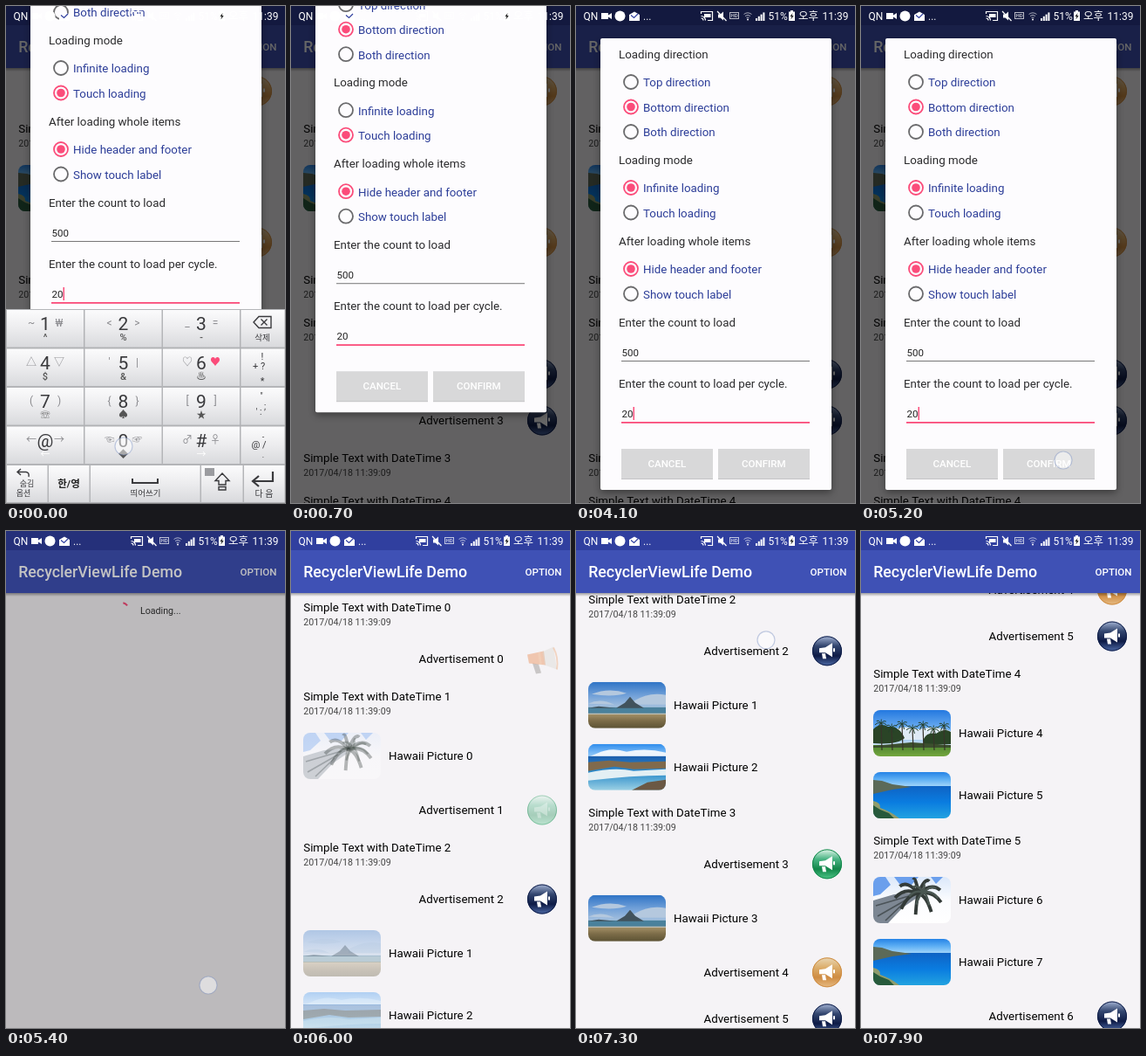
An HTML page with a canvas that plays this animation: 320x569 px, repeating every 8 s.

```html
<!DOCTYPE html>
<html lang="ko">
<head>
<meta charset="utf-8">
<title>List loading demo</title>
<style>
html, body { margin: 0; width: 100%; height: 100%; overflow: hidden; }
canvas { display: block; }
</style>
</head>
<body>
<canvas id="stage" width="320" height="569"></canvas>
<script>
const c = document.getElementById('stage').getContext('2d');
const FONT = 'Roboto, "Noto Sans CJK KR", "Noto Sans CJK", "DejaVu Sans", sans-serif';
const PINK = '#fb4c7a', LOOP = 8000, STEP = 100, HEADER = 71, MARGIN = 14.22;
const HEIGHT = { t: 49, a: 53, p: 71 };
const OLD_LIST = { items: 'atpattaatt', ads: [3, 3, 2, 2], pics: [3] };
const NEW_LIST = { items: 'tatpatapptapaatpptpp', ads: [0, 1, 2, 1, 3, 2], pics: [0, 1, 2, 1, 4, 3, 0, 3] };

const clamp = v => Math.max(0, Math.min(1, v));
const ease = v => (v = clamp(v)) * v * (3 - 2 * v);

function text(s, x, y, size = 13.33, color = '#000', weight = 400, align = 'left') {
  c.font = `${weight} ${size}px ${FONT}`;
  c.fillStyle = color;
  c.textAlign = align;
  c.fillText(s, x, y + size * .36);
}
const label = (s, x, y, size, color, weight) => text(s, x, y, size, color, weight, 'center');
function rect(x, y, w, h, color) { c.fillStyle = color; c.fillRect(x, y, w, h); }
function shape(d, color) { c.fillStyle = color; c.fill(new Path2D(d)); }
function line(d, color, width = 1) {
  c.strokeStyle = color;
  c.lineWidth = width;
  c.stroke(new Path2D(d));
}
function disc(x, y, r, color) {
  c.fillStyle = color;
  c.beginPath();
  c.arc(x, y, r, 0, 7);
  c.fill();
}
function ring(x, y, r, color, width, from = 0, to = 7) {
  c.strokeStyle = color;
  c.lineWidth = width;
  c.beginPath();
  c.arc(x, y, r, from, to);
  c.stroke();
}
function vertical(y0, y1, ...colors) {
  const g = c.createLinearGradient(0, y0, 0, y1);
  colors.forEach((color, i) => g.addColorStop(i / (colors.length - 1), color));
  return g;
}
function group(x, y, alpha, draw) {
  c.save();
  c.translate(x, y);
  c.globalAlpha *= alpha;
  draw();
  c.restore();
}

function fronds(x, y, size, count, color) {
  for (let i = 0; i < count; i++) {
    const a = i / count * 6.28 + .3, dx = Math.cos(a) * size, dy = Math.sin(a) * size * .75;
    line(`M${x} ${y}Q${x + dx * .6} ${y + dy * .6 - size * .3} ${x + dx} ${y + dy + size * .15}`, color, size / 7);
  }
}

const SCENES = [
  () => {
    rect(0, 0, 89, 53, vertical(0, 53, '#dbe8fa', '#fbfcfe', '#ffffff'));
    shape('M0 0H14L20 9L8 20L0 22ZM24 0H52L44 9L30 8ZM66 0H80L72 8Z', '#6b9fec');
    shape('M0 27L24 20L47 18L50 24L34 35L17 53H0Z', '#7d8793');
    line('M3 33L44 21M5 45L40 25M14 50L36 29', '#4b5358', 1.6);
    fronds(52, 19, 27, 9, '#333b38');
    fronds(58, 18, 17, 7, '#4a5752');
  },
  () => {
    rect(0, 0, 89, 30, vertical(0, 30, '#2f74c6', '#6f9fd8', '#a9c3de'));
    shape('M4 14Q24 6 44 13Q28 18 4 14ZM52 22Q70 11 89 15V26H52ZM0 25Q14 18 30 26Z', '#b4c8de');
    rect(0, 29, 89, 8, '#4a819c');
    shape('M0 30L12 28L32 30ZM32 30L42 24L48 17L54 24L64 30Z', '#41525c');
    rect(0, 36, 89, 17, vertical(36, 53, '#a8946a', '#7c6c48', '#5c5234'));
    line('M0 36.500H89', '#c3cbc8');
  },
  () => {
    rect(0, 0, 89, 15, vertical(0, 15, '#2f8ded', '#9ed0fa'));
    shape('M10 11Q26 3 44 9Q66 4 89 10V15H0Z', '#eef5fc');
    rect(0, 14, 89, 39, vertical(14, 53, '#1c5fae', '#2f8ecb', '#9bd0e4'));
    shape('M0 21L24 19L48 21L89 20V28L52 29L30 26L0 31Z', '#806a4c');
    shape('M0 33Q30 26 52 31L89 29V36Q50 36 0 42Z', '#e3eff4');
    shape('M50 53L68 44L89 41V53Z', '#6b5844');
  },
  () => {
    rect(0, 0, 89, 17, vertical(0, 17, '#2583e6', '#5fb0f4', '#a8d8fa'));
    rect(0, 16, 89, 37, vertical(16, 53, '#0f63c4', '#0a7ce0', '#22a2e0'));
    shape('M0 9L10 10L22 14L44 17L22 20L0 25Z', '#5c6a58');
    shape('M0 33Q9 35 8 41Q20 45 30 53H0Z', '#8f9c6c');
    shape('M0 38L8 43L18 47L24 53H0Z', '#275a3c');
  },
  () => {
    rect(0, 0, 89, 42, vertical(0, 42, '#2479e0', '#6cadf0', '#d3e6f6'));
    shape('M20 24Q34 16 52 22Q70 17 89 24V34H20Z', '#dfeaf5');
    rect(0, 40, 89, 13, vertical(40, 53, '#4f8430', '#73a63e'));
    shape('M0 22Q8 14 17 19Q30 18 36 32Q28 40 0 38ZM58 33Q62 25 72 27Q82 20 89 25V39H58Z', '#2a4426');
    shape('M0 41L44 37L89 40V43H0Z', '#3c4f2e');
    for (let i = 0; i < 7; i++) {
      const x = 9 + i * 12, y = 15 + i * 5 % 9;
      line(`M${x} ${y}L${x + 1} 46`, '#38342a', 1.2);
      fronds(x, y, 7, 7, '#24402a');
    }
  }
];

function picture(kind, y, alpha) {
  group(14, y - 26.5, alpha, () => {
    c.beginPath();
    c.roundRect(0, 0, 89, 53, 8);
    c.clip();
    SCENES[kind]();
  });
}

const SPHERES = [
  null,
  ['#e2f6ea', '#49b483', '#12874a', '#4cc486'],
  ['#a3b3d4', '#33466f', '#0e1b46', '#4d6aa6'],
  ['#e8d6b4', '#dcae6c', '#cf8c42', '#e6bb84']
];
function adIcon(kind, y, alpha) {
  group(288, y, alpha, () => {
    if (!kind) {
      shape('M-11 5L-4 6L-1 16L-7 17Z', '#77736e');
      shape('M-17 -5L2 -9L4 7L-15 5Z', '#e8732c');
      shape('M0 -8L13 -14L17 12L3 7Z', '#d8d3cb');
      shape('M-5 -7L-2 -8L0 7L-3 6Z', '#f3d9c4');
      line('M13 -13Q19 -2 17 12', '#ee9a5e', 1.8);
      return;
    }
    disc(0, 0, 17, vertical(-17, 17, ...SPHERES[kind]));
    ring(0, 0, 16.5, SPHERES[kind][2], 1);
    shape('M-9 -3L-2 -4L6 -9V7L-2 2L-9 2ZM-6 3L-2 3L-1 9L-5 9Z', '#fff');
    line('M8 -3V1', '#fff', 2);
  });
}

function spinnerRow(y, time) {
  const start = -1.57 + time / 380, sweep = .4 + 4 * ease(time / 667);
  ring(132, y, 9, PINK, 2, start, start + sweep);
  text('Loading...', 154, y, 10.67, '#333');
}

function adRow(n, kind, y, alpha, iconAlpha) {
  group(0, 0, alpha, () => {
    text('Advertisement ' + n, 146.5, y);
    adIcon(kind, y, iconAlpha);
  });
}

function drawList({ items, ads, pics }, scroll, alpha) {
  const count = { t: 0, a: 0, p: 0 };
  let y = HEADER - scroll;
  for (const type of items) {
    const n = count[type]++, mid = y + HEIGHT[type] / 2;
    if (y < 569 && y + HEIGHT[type] > 0) {
      if (type === 't') {
        text('Simple Text with DateTime ' + n, MARGIN, y + 16.5);
        text('2017/04/18 11:39:09', MARGIN, y + 33.5, 10.67, '#444');
      } else if (type === 'a') {
        adRow(n, ads[n], mid, 1, ads[n] === 2 ? 1 : alpha);
      } else {
        picture(pics[n], mid, alpha);
        text('Hawaii Picture ' + n, 112, mid);
      }
    }
    y += HEIGHT[type];
  }
  return y;
}

function appBar() {
  rect(0, HEADER, 320, 4, vertical(HEADER, HEADER + 4, 'rgba(0,0,0,.35)', 'rgba(0,0,0,0)'));
  rect(0, 0, 320, HEADER, '#3f51b5');
  rect(0, 0, 320, 22, '#303f9f');
  text('RecyclerViewLife Demo', MARGIN, 47, 17.78, '#fff', 500);
  text('OPTION', 268.6, 47, 11.56, '#fff', 500);
}

function statusIcons() {
  const W = '#fff', dim = 'rgba(255,255,255,.7)';
  text('QN', 8.5, 11.5, 12, W);
  shape('M29 8H37V10.500L41 8V15L37 12.500V15H29Z', W);
  disc(50.5, 11.5, 6, W);
  shape('M61 10L67 6.500L73 10V17H61Z', W);
  line('M63 10.500L66.500 13.500L71 9', '#303f9f', 1.2);
  text('...', 77, 11.5, 12, W);
  line('M143.500 9V6.500H156.500V16.500H151M143.500 11.500A5 5 0 0 1 148.500 16.500M143.500 14A2.500 2.500 0 0 1 146 16.500', W, 1.2);
  rect(147, 9, 7.5, 4, W);
  shape('M163 9.500H165.500L169 6.500V16.500L165.500 13.500H163Z', W);
  line('M162 6L172.500 17', W, 1.2);
  c.strokeStyle = dim;
  c.lineWidth = 1;
  c.strokeRect(176.5, 7.5, 10, 7);
  label('HD', 181.5, 11.3, 6, dim, 700);
  for (const r of [2.5, 5, 7.5]) ring(197, 15.5, r, dim, .9, -2.2, -.94);
  disc(197, 15.5, 1, W);
  for (let i = 0; i < 4; i++) rect(206 + i * 2.8, 14 - i * 2.2, 2, 3 + i * 2.2, W);
  text('51%', 220.5, 11.5, 12, W);
  shape('M246 5H249V6.500H251V17H244V6.500H246Z', W);
  shape('M248.500 8L245.500 12H247.300L246.500 15.500L249.700 11H247.800Z', '#222');
  text('오후', 255, 11.5, 12.5, W);
  text('11:39', 282.6, 11.5, 12, W);
}

function radio(name, y, on) {
  ring(63, y, 8, on > .5 ? PINK : '#6a6a6c', 1.8);
  if (on) disc(63, y, 4.8 * on, PINK);
  text(name, 77, y + .5, 13.33, '#2c3d98');
}

function dialog(t) {
  const infinite = clamp((t - 2000) / 200);
  c.save();
  c.shadowColor = 'rgba(0,0,0,.4)';
  c.shadowBlur = 8;
  c.shadowOffsetY = 3;
  c.beginPath();
  c.roundRect(28, 37, 265, 517, 2);
  c.fillStyle = '#fdfcfe';
  c.fill();
  c.restore();
  [['Loading direction', 55], ['Loading mode', 176], ['After loading whole items', 269],
    ['Enter the count to load', 362], ['Enter the count to load per cycle.', 432]]
    .forEach(([s, y]) => text(s, 49, y, 13.33, '#2a2a2c'));
  radio('Top direction', 87, 0);
  radio('Bottom direction', 115.5, 1);
  radio('Both direction', 144, 0);
  radio('Infinite loading', 208, infinite);
  radio('Touch loading', 236.5, 1 - infinite);
  radio('Hide header and footer', 301, 1);
  radio('Show touch label', 329.5, 0);
  text('500', 52.5, 397, 11.56, '#222');
  rect(52, 406, 216, 1, '#777');
  text('20', 52.5, 467, 11.56, '#222');
  rect(52, 476, 216, 1.8, PINK);
  if (Math.floor((t + 35) / 505) % 2 === 0) rect(65.5, 459, 1.5, 15, PINK);
  [['CANCEL', 52], ['CONFIRM', 163]].forEach(([s, x]) => {
    rect(x, 508, 105, 34, '#c4c4c6');
    rect(x, 507, 105, 34, '#d8d8d9');
    label(s, x + 52.3, 524, 11.56, '#fff', 500);
  });
}

const KEYS = ['~1₩^', '<2>%', '_3=-', '△4▽$', "'5|&", '♡6♥♨', '(7)☏', '{8}♠', '[9]★', '←@→←', '☜0☞◆', '♂#♀→'];
function keyBox(x, y, w, h) {
  rect(x, y, w, h, '#b4b5b8');
  rect(x + 1, y + 1, w - 1.5, h - 2, vertical(y, y + h, '#fcfcfd', '#ececee', '#d8d9dc'));
}
function keyboard() {
  const dark = '#3a3a3d', grey = '#8b8b8f', small = (s, x, y, size = 9) => label(s, x, y, size, dark);
  rect(0, 347, 320, 222, '#a8a9ac');
  KEYS.forEach((key, i) => {
    const col = i % 3, row = Math.floor(i / 3), x = col * 89.5, y = 347 + row * 44.5, mid = x + 45;
    const [left, main, right, sub] = [...key];
    keyBox(x, y, 89.5, 44.5);
    label(left, mid - 16, y + 16, 12, grey);
    label(main, mid, y + 16.5, 21, dark);
    label(right, mid + 16, y + 16, 12, right === '♥' ? PINK : grey);
    label(sub, mid, y + 32.5, 11, '←→'.includes(sub) ? '#fff' : '#555', 500);
  });
  for (let row = 0; row < 4; row++) keyBox(268.5, 347 + row * 44.5, 51.5, 44.5);
  line('M284 362L290 355.500H304V368.500H290ZM292.500 358.500L299.500 365.500M299.500 358.500L292.500 365.500', dark, 1.4);
  small('삭제', 294, 380, 9.5);
  small('!', 294, 401, 11);
  small('+ ?', 290, 412, 11);
  small('*', 294, 429, 11);
  small('"', 293, 446, 10);
  small(';', 297, 458, 10);
  small("' :", 290, 464, 10);
  small('@ /', 290, 502, 11);
  small('-', 295, 493);
  small('.', 295, 514);

  [0, 48, 96, 223, 272, 320].forEach((x, i, all) => i < 5 && keyBox(x, 525, all[i + 1] - x, 44));
  line('M17 537L13 533.500L17 530M13 533.500H23Q27 534 26 539', dark, 1.4);
  small('숨김', 24, 547);
  small('옵션', 20, 558);
  label('한/영', 72, 547, 11.5, '#222', 700);
  line('M145 541V546H174V541', dark, 2);
  small('띄어쓰기', 160, 558, 9.5);
  rect(228, 529, 11, 9, '#9b9ca0');
  line('M248 535L256 543.500H252V548H244V543.500H240ZM244 550.500H252V554H244Z', dark, 1.4);
  line('M306 533V544H284M290 538L283 544L290 550', dark, 2.2);
  small('다 음', 296, 558, 10);
}

// x, y, start, end
const TOUCHES = [[135, 504, 0, 200], [69, 203, 1900, 2300], [147, 113, 3400, 3800], [232, 520, 5100, 5600], [218, 409, 7000, 7500]];
function touches(t, scroll) {
  for (const [x, y, start, end] of TOUCHES) {
    if (t < start || t >= end) continue;
    group(x, Math.max(y - scroll, 120), clamp((end - t) / 200), () => {
      disc(0, 0, 10, 'rgba(255,255,255,.5)');
      ring(0, 0, 10, 'rgba(110,135,190,.4)', 1.2);
    });
  }
}

function draw(t) {
  const scroll = 722 * ease((t - 7000) / 700);
  rect(0, 0, 320, 569, '#f5f3f6');
  if (t < 5300) {
    drawList(OLD_LIST, 0, 1);
  } else if (t < 6000) {
    spinnerRow(91, t - 5300);
  } else {
    const end = drawList(NEW_LIST, scroll, .35 + .65 * clamp((t - 6000) / 300));
    if (t < 7800) spinnerRow(end + 20, t - 7300);
    else adRow(6, 2, end + 26.5, clamp((t - 7700) / 200), 1);
  }
  appBar();
  rect(0, 0, 320, 569, `rgba(0,0,0,${.6 * clamp((5530 - t) / 330)})`);
  if (t < 5400) {
    group(0, -137 * (1 - ease((t - 500) / 500)), clamp((5400 - t) / 200), () => dialog(t));
  }
  statusIcons();
  if (t < 700) group(0, 222 * clamp((t - 400) / 300), 1, keyboard);
  touches(t, scroll);
}

// The picture advances in 100 ms steps, like a screen recording.
const origin = performance.now();
function tick() {
  const t = (performance.now() - origin) % LOOP;
  draw(Math.floor(t / STEP) * STEP);
  requestAnimationFrame(tick);
}
tick();
</script>
</body>
</html>
```
